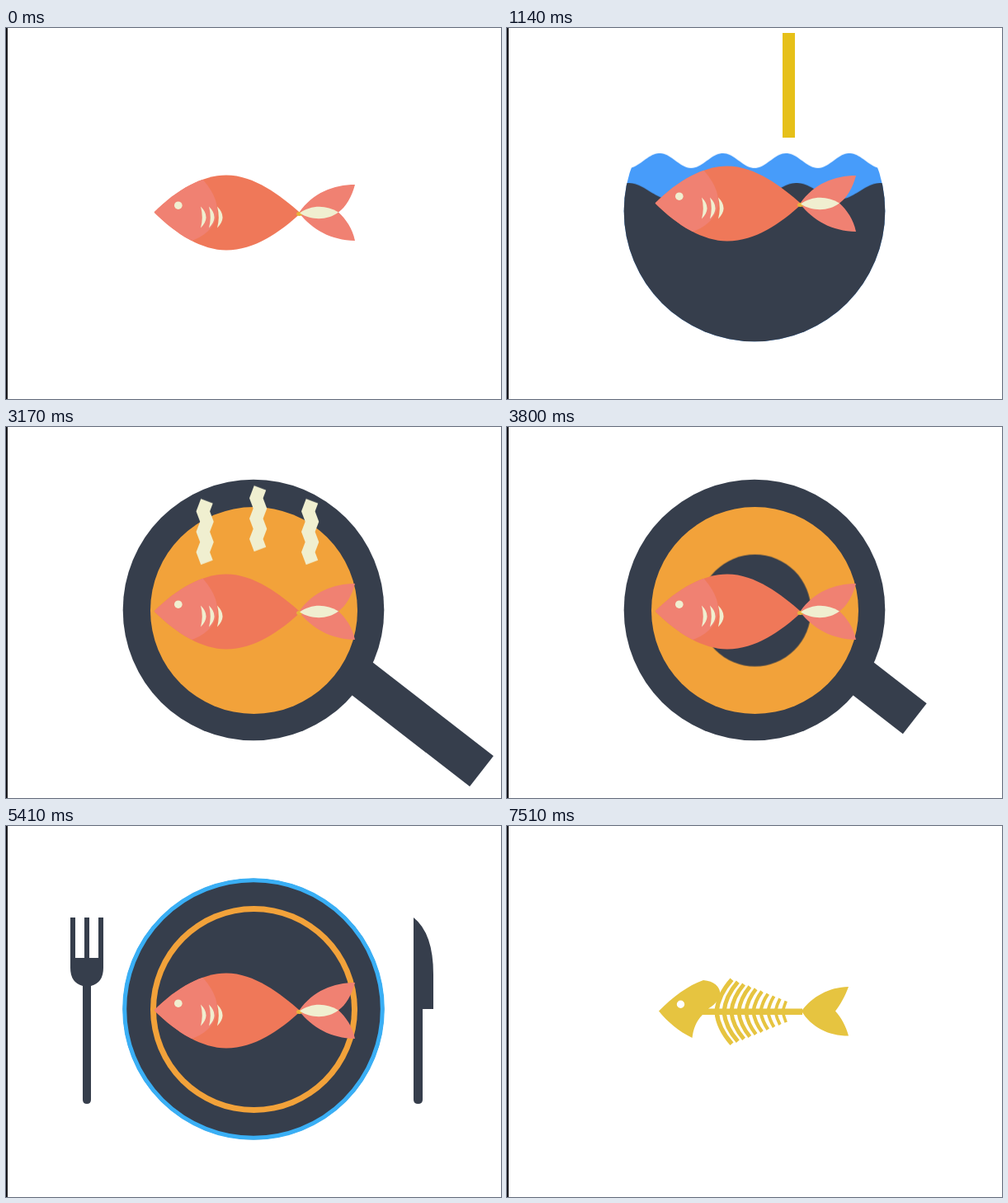
Animation, 600 px wide and 450 px high, one loop 7580 ms. Source, as an HTML page:

```html
<!DOCTYPE html>
<html lang="en">
<head>
<meta charset="utf-8">
<title>Fish story</title>
<style>
  html, body { margin: 0; width: 100%; height: 100%; overflow: hidden; background: #fff; }
  svg { display: block; width: 600px; height: 450px; }

  .dark { fill: #363e4c; }
  .cream { fill: #f0efd0; }
  .pink { fill: #f08172; }
  .line { fill: none; stroke-dasharray: 1 1.1; }
  .anim { animation: 7.58s linear infinite; }
  .disc { transform-box: fill-box; transform-origin: center; }

  /* water fills the bowl */
  #sea { animation-name: sea; }
  #foam { animation-name: foam; }
  @keyframes sea {
    0%, .92% { transform: translateY(470px); }
    15.04% { transform: translateY(198px); }
    21.37% { transform: translateY(76px); }
    22.43%, 85% { transform: translateY(50px); }
    85.01%, 100% { transform: translateY(470px); }
  }
  @keyframes foam {
    0%, .92% { transform: translateY(395px); }
    15.04% { transform: translateY(161px); }
    21.37%, 23% { transform: translateY(46px); }
    23.01%, 100% { transform: translateY(470px); }
  }

  /* dark, then red, drains away */
  #ebb { animation-name: ebb; }
  #blood { animation-name: blood; }
  @keyframes ebb {
    0%, 84% { transform: translateY(470px); }
    84.01%, 85.22% { transform: translateY(50px); }
    87.07% { transform: translateY(104px); }
    97.02%, 100% { transform: translateY(400px); }
  }
  @keyframes blood {
    0%, 84.5% { transform: translateY(470px); }
    84.51%, 92.61% { transform: translateY(48px); }
    98.68%, 100% { transform: translateY(400px); }
  }

  /* hook */
  #rod { animation-name: rod; }
  #hook { animation-name: hook; }
  @keyframes rod {
    0%, 12.05% { stroke-dashoffset: 1; }
    17.2%, 23.7% { stroke-dashoffset: 0; }
    25.2%, 100% { stroke-dashoffset: 1; }
  }
  @keyframes hook {
    0%, 17.2% { stroke-dashoffset: 1; }
    21.3%, 22.43% { stroke-dashoffset: 0; }
    23.7%, 100% { stroke-dashoffset: 1; }
  }

  /* pan and plate */
  #pan { animation-name: pan; }
  #dish { animation-name: dish; }
  #handle { animation-name: handle; }
  #rim { animation-name: rim; }
  @keyframes pan {
    0%, 22.2% { transform: scale(0); }
    25.2%, 85.1% { transform: scale(1); }
    85.11%, 100% { transform: scale(0); }
  }
  @keyframes dish {
    0%, 46.44% { transform: scale(0); animation-timing-function: ease-out; }
    55.67%, 83.38% { transform: scale(1); }
    85%, 85.1% { transform: scale(1.07); }
    85.11%, 100% { transform: scale(0); }
  }
  @keyframes handle {
    0%, 28.5% { stroke-dashoffset: 1; animation-timing-function: ease-out; }
    34.43%, 46% { stroke-dashoffset: 0; animation-timing-function: ease-in; }
    52%, 100% { stroke-dashoffset: 1; }
  }
  @keyframes rim {
    0%, 55.67% { stroke-dashoffset: 1; }
    60.29%, 83.38% { stroke-dashoffset: 0; }
    85%, 100% { stroke-dashoffset: 1; }
  }

  /* steam */
  #steam { animation-name: rise; }
  .puff { animation-name: puff; }
  @keyframes rise {
    0%, 36.28% { transform: translateY(92px); }
    41.82% { transform: none; }
    45.51%, 100% { transform: translateY(-61px); }
  }
  @keyframes puff {
    0%, 36.28% { stroke-dashoffset: 1; }
    38.92%, 42.88% { stroke-dashoffset: 0; }
    45.51%, 100% { stroke-dashoffset: -1; }
  }

  /* fish */
  #bob { animation-name: bob; animation-timing-function: ease-in-out; }
  #eaten { animation-name: eaten; animation-timing-function: steps(5); }
  #bones { animation-name: bones; color: #e6c440; }
  @keyframes bob {
    0%, 9% { transform: none; }
    15.04% { transform: translateY(-11px); }
    21.37% { transform: translateY(15px); }
    25.2%, 100% { transform: none; }
  }
  @keyframes eaten {
    0%, 73.22% { clip-path: inset(0 0 0 0); }
    81.53%, 100% { clip-path: inset(0 100% 0 0); }
  }
  @keyframes bones {
    0%, 73.2% { opacity: 0; }
    73.21%, 100% { opacity: 1; }
  }

  /* cutlery */
  #fork { animation-name: fork; }
  #knife { animation-name: knife; }
  #fork, #knife { animation-timing-function: ease-in-out; }
  @keyframes fork {
    0%, 64.5% { transform: translateX(-130px); }
    68.6% { transform: translateX(3px); }
    71.37%, 73.22% { transform: none; }
    75.3% { transform: translateY(-8px); }
    77.4% { transform: translateY(5px); }
    79.5% { transform: translateY(-8px); }
    81.53%, 83.38% { transform: none; }
    86%, 100% { transform: scale(0); }
  }
  @keyframes knife {
    0%, 64.5% { transform: translateX(130px); }
    68.6% { transform: translateX(-3px); }
    71.37%, 73.22% { transform: none; }
    75.3% { transform: translateY(5px); }
    77.4% { transform: translateY(-8px); }
    79.5% { transform: translateY(5px); }
    81.53%, 83.38% { transform: none; }
    86%, 100% { transform: scale(0); }
  }
</style>
</head>
<body>
<svg viewBox="0 0 600 450">
  <defs>
    <clipPath id="bowl"><circle cx="300" cy="222" r="158.3"/></clipPath>
    <path id="body" d="M179.500 223.500C207 196 238 178.500 267 178.500C301 178.500 332 203 357 224.500C332 248 301 269.500 267 269.500C238 269.500 207 251 179.500 223.500Z"/>
    <clipPath id="skin"><use href="#body"/></clipPath>
    <path id="gill" class="cream" d="M236 216.500Q249 229.500 236 242.500Q239.500 229.500 236 216.500Z"/>
  </defs>

  <path id="handle" class="anim line" pathLength="1" stroke="#363e4c" stroke-width="47" d="M425 300L576.500 417.500"/>

  <g clip-path="url(#bowl)">
    <path id="foam" class="anim" fill="#479cfa"/>
    <path id="sea" class="anim dark"/>
    <path id="blood" class="anim" fill="#f1785f"/>
    <path id="ebb" class="anim dark"/>
  </g>

  <circle id="pan" class="anim disc" cx="300.500" cy="222.500" r="125.500" fill="#f2a23a"/>
  <circle id="dish" class="anim disc dark" cx="300.500" cy="222.500" r="118.500"/>
  <circle id="rim" class="anim line" pathLength="1" cx="300" cy="222" r="156.300" stroke="#3aaff5" stroke-width="5" transform="rotate(-90 300 222)"/>

  <g stroke="#e6c018">
    <path id="rod" class="anim line" pathLength="1" stroke-width="15" d="M341.500 6V224"/>
    <path id="hook" class="anim line" pathLength="1" stroke-width="7" d="M341.500 224V303A40.500 40.500 0 0 1 279 338.500"/>
  </g>

  <g id="steam" class="anim" stroke="#f0efd0" stroke-width="15.500"></g>

  <g id="fork" class="anim disc dark">
    <path d="M78 111H84V160H95V111H101V160H112V111H118V172Q118 190 103 194V332Q103 337 98 337Q93 337 93 332V194Q78 190 78 172Z"/>
  </g>
  <g id="knife" class="anim disc dark">
    <path d="M494 111Q518 130 518 180V222H505V332Q505 337 499.500 337Q494 337 494 332Z"/>
  </g>

  <g id="bones" class="anim" fill="currentColor" stroke="none">
    <path fill-rule="evenodd" d="M184 224.500C200 208 220 193 238 187C251 188 258.500 195 258.500 204C257 212 249 219 244 221.500H358V229H237C229 237 226 246 224.500 257C208 249 195 238 184 224.500ZM205.800 216.300a4.700 4.700 0 1 0 9.400 0a4.700 4.700 0 1 0 -9.400 0Z"/>
    <path d="M357 224.500C370 207 390 195.500 414 195C410 206 404 217 398 224.500C405 232 411 243 414 254.500C389 254.500 369 244 357 224.500Z"/>
    <g id="ribs" fill="none" stroke="currentColor"></g>
  </g>

  <g id="eaten" class="anim">
    <g id="bob" class="anim">
      <use href="#body" fill="#ef7859"/>
      <path class="pink" clip-path="url(#skin)" d="M180 179H234Q258 203 256 226Q251 250 222 259L180 260Z"/>
      <use href="#gill"/>
      <use href="#gill" x="10"/>
      <use href="#gill" x="20"/>
      <circle class="cream" cx="208.800" cy="215.200" r="4.800"/>
      <path class="pink" d="M355.500 223.500C372 200 397 190 423 190C419 205 412 217 403 223.500C412 232 420 243 423 258C394 257.500 371 244.500 355.500 224.500Z"/>
      <ellipse cx="355.500" cy="225.500" rx="3.500" ry="2.500" fill="#e8b23a"/>
      <path class="cream" d="M356 224.500C370 214.500 388 214.500 403 223.500C390 233.500 370 233.500 356 224.500Z"/>
    </g>
  </g>

  <rect width="2" height="450" fill="#18181d"/>
</svg>
<script>
  const el = id => document.getElementById(id);

  // Liquid body whose surface has a trough on the bowl's centre line.
  function wave(id, period, amp) {
    let d = 'M130 430';
    for (let x = 130; x <= 470; x += 2) {
      const y = amp * Math.cos((x - 300) / period * 2 * Math.PI);
      d += `L${x} ${y.toFixed(2)}`;
    }
    el(id).setAttribute('d', d + 'V430Z');
  }
  wave('foam', 76.7, 9);
  wave('sea', 102, 10);
  wave('blood', 123, 12);
  wave('ebb', 123, 12);

  // Zigzag puffs, drawn from the bottom up.
  const puff = (x, y) => {
    let d = `M${x} ${y}`;
    for (let i = 1; i <= 6; i++) d += `l${i % 2 ? -4.7 : 4.7} -12.4`;
    return `<path class="anim line puff" pathLength="1" d="${d}"/>`;
  };
  el('steam').innerHTML = puff(243.5, 164.5) + puff(308, 148.5) + puff(371, 164.5);

  // Ribs shrink toward the tail and mirror across the spine.
  const spine = 225.2;
  let ribs = '';
  for (let i = 0; i < 10; i++) {
    const x = 272.5 + 7.3 * i, base = 254 + 8.9 * i;
    const reach = 39 - 2.9 * i, bend = reach / 2 + 1;
    ribs += `<path stroke-width="${5.4 - 0.2 * i}" d="M${x} ${spine - reach}` +
      `Q${base + 2} ${spine - bend} ${base} ${spine}Q${base + 2} ${spine + bend} ${x} ${spine + reach}"/>`;
  }
  el('ribs').innerHTML = ribs;
</script>
</body>
</html>
```
